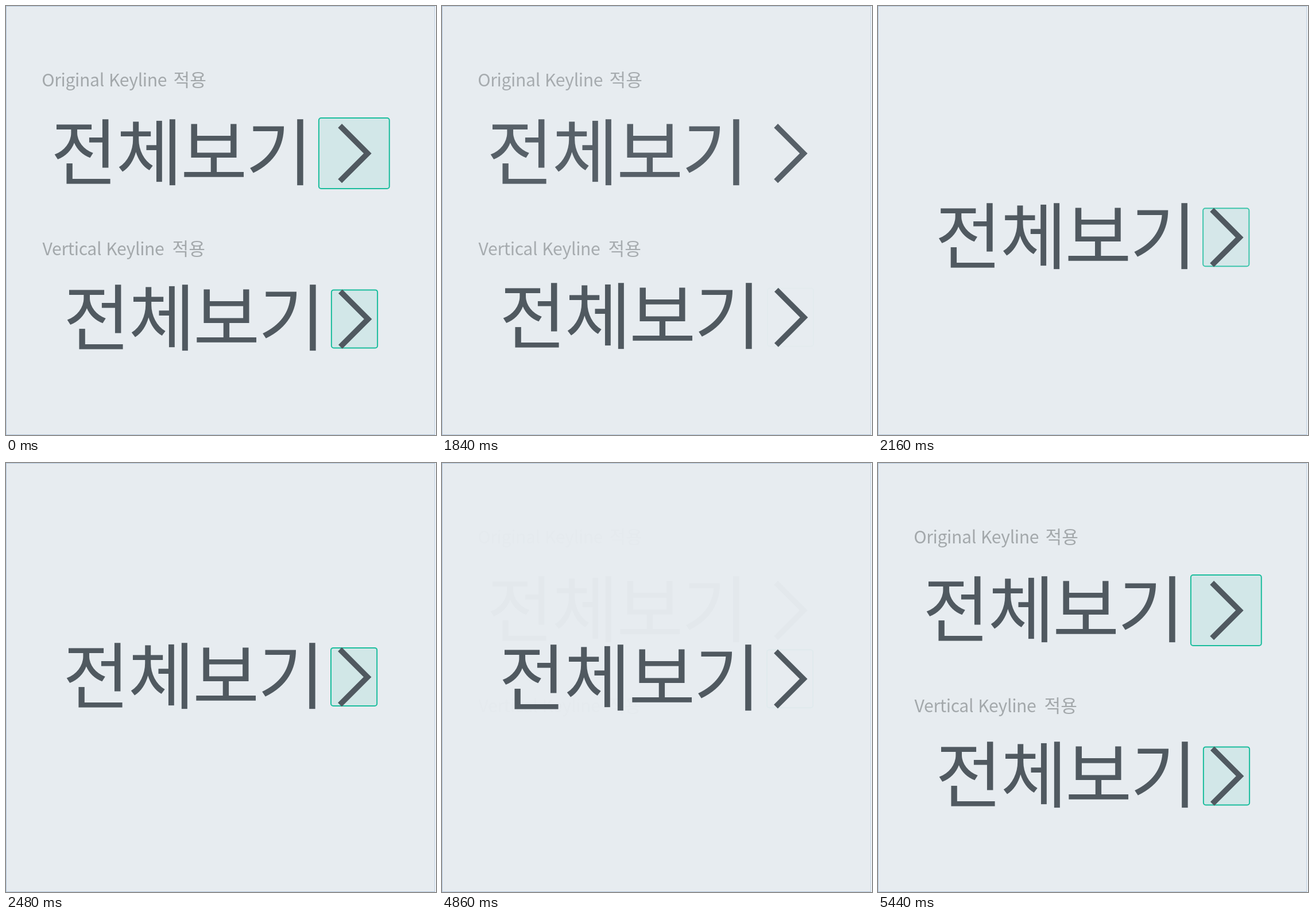
Write an HTML page that moves like this. It is 749 px wide and 747 px high and loops after 6580 ms.

```html
<!DOCTYPE html>
<html lang="ko">
<head>
<meta charset="utf-8">
<title>Keyline</title>
<style>
  html, body { margin: 0; width: 100%; height: 100%; overflow: hidden; background: #fff; }
  svg { display: block; width: 100%; height: 100%; }
  text { font-family: "Noto Sans CJK KR", "Noto Sans CJK", "Noto Sans KR", sans-serif; }
  .label { font-size: 30.2px; letter-spacing: -.38px; fill: #a3a8ab; }
  .label tspan { font-size: 31.2px; letter-spacing: 0; }
  .word { font-size: 126.5px; fill: #505960; }
  .arrow { fill: none; stroke: #505960; stroke-width: 9.6; stroke-miterlimit: 10; }
  .box { fill: #1bbd9d; fill-opacity: .1; stroke: #1bbd9d; stroke-width: 2; }
</style>
</head>
<body>
<svg viewBox="0 0 749 747">
  <rect x=".5" y=".5" width="746.5" height="746" fill="#e7ecf0" stroke="#b3c7dd"/>
  <g id="upper">
    <text class="label" x="62.2" y="139.5">Original Keyline <tspan x="291.6">적용</tspan></text>
    <text class="label" x="63.6" y="433.5">Vertical Keyline <tspan x="289.6">적용</tspan></text>
    <rect id="squareBox" class="box" x="544.9" y="195" width="122.9" height="122.9" rx="4"/>
    <text class="word" x="78 191.5 304 417.5" y="301.6">전체보기</text>
    <path class="arrow" d="M581.7 208.5l48.2 48.2l-48.2 48.2"/>
  </g>
  <g id="lower">
    <rect id="tallBox" class="box" x="566.9" y="494.4" width="80.2" height="101" rx="4"/>
    <text class="word" x="100 213.5 326 439.5" y="590.1">전체보기</text>
    <path class="arrow" d="M582.4 497l48.2 48.2l-48.2 48.2"/>
  </g>
</svg>
<script>
  const LOOP = 6580, TICK = 20, RISE = 172.5;
  const [upper, lower, squareBox, tallBox] =
    ["upper", "lower", "squareBox", "tallBox"].map(id => document.getElementById(id));

  const linear = (t, start, length) => Math.min(1, Math.max(0, (t - start) / length));
  const bezier = (s, a, b) => 3 * s * (1 - s) ** 2 * a + 3 * s * s * (1 - s) * b + s ** 3;

  // cubic-bezier(.25, .1, .25, 1)
  function ease(t, start, length) {
    const x = linear(t, start, length);
    if (x === 0 || x === 1) return x;
    let lo = 0, hi = 1;
    for (let i = 0; i < 24; i++) {
      const mid = (lo + hi) / 2;
      if (bezier(mid, .25, .25) < x) lo = mid; else hi = mid;
    }
    return bezier(lo, .1, 1);
  }

  function draw(time) {
    const t = Math.floor((time % LOOP) / TICK) * TICK;
    const returning = t >= 4840;
    const boxIn = ease(t, 4840, 450);
    const firstOut = 1 - linear(t, 440, 280);

    const rise = ease(t, 1820, 650) - ease(t, 4840, 600);
    lower.setAttribute("transform", `translate(${-0.9 * rise} ${-RISE * rise})`);

    upper.setAttribute("opacity", returning ? ease(t, 4840, 500) : 1 - ease(t, 1820, 300));
    squareBox.setAttribute("opacity", returning ? boxIn : firstOut);

    let tall = firstOut;
    if (returning) tall = boxIn;
    else if (t >= 3280) tall = 1 - .92 * linear(t, 3280, 280);
    else if (t >= 1820) tall = ease(t, 1820, 650);
    tallBox.setAttribute("opacity", tall);
  }

  const begin = performance.now();
  function frame() {
    draw(performance.now() - begin);
    requestAnimationFrame(frame);
  }
  frame();
</script>
</body>
</html>
```
